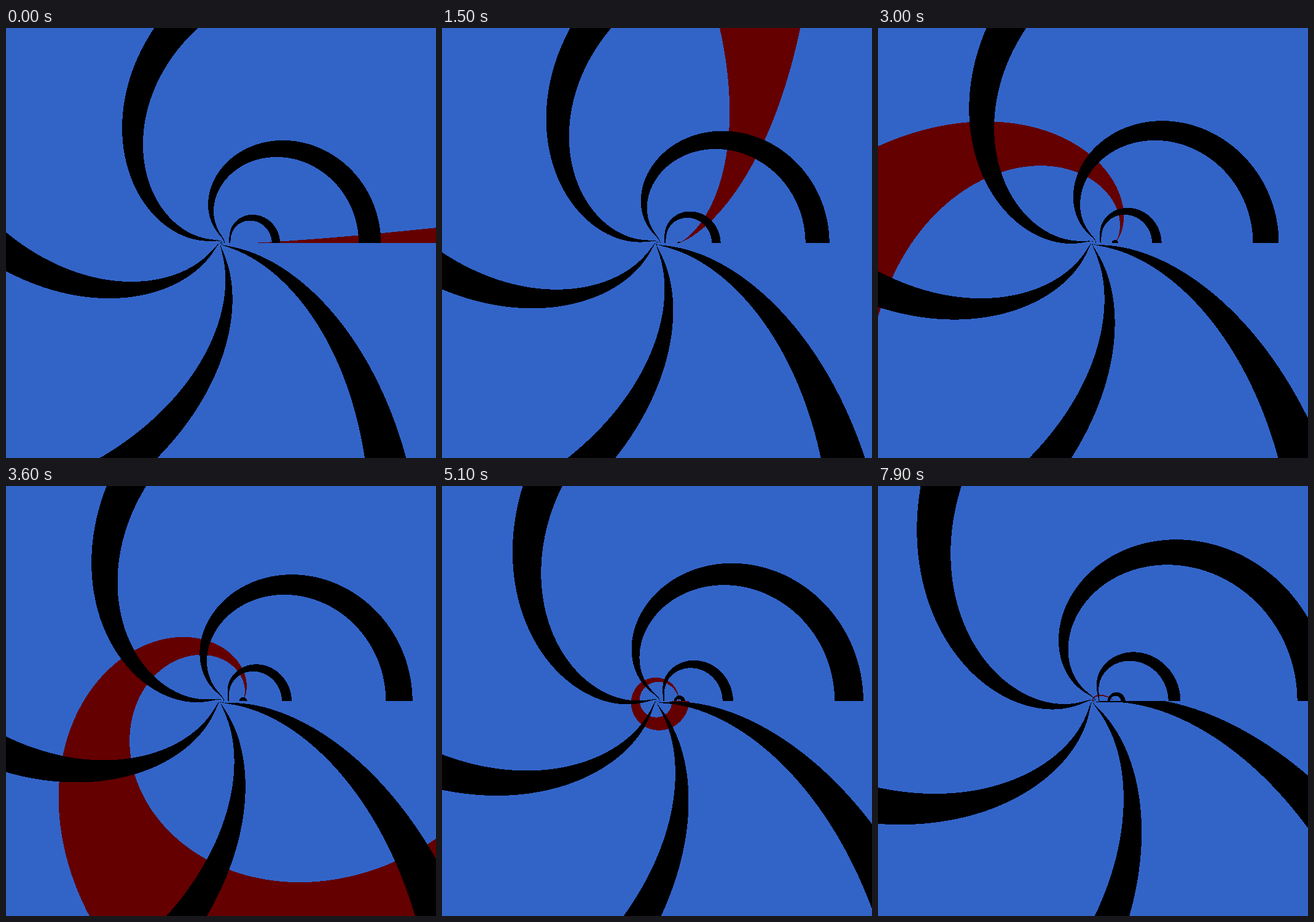
An HTML page with a canvas for the animation above (8 s loop, 700 by 700 pixels).

```html
<!DOCTYPE html>
<html lang="en">
<head>
<meta charset="utf-8">
<title>Complex logarithm</title>
<style>
  html, body { margin: 0; width: 100%; height: 100%; overflow: hidden; background: #3264c8; }
  canvas { display: block; width: 100vw; height: 100vh; image-rendering: pixelated; }
</style>
</head>
<body>
<canvas id="stage" width="700" height="700"></canvas>
<script>
const SIZE = 700, HALF = SIZE / 2, UNIT = 35, TAU = 2 * Math.PI;
const STEP_MS = 100, STEPS = 80, PHASE_STEP = 0.005;
const RING_WIDTH = 0.15, RAY_WIDTH = 0.02;

// 0xAABBGGRR
const BLUE = 0xffc86432, RED = 0xff000064, BLACK = 0xff000000;

const ctx = document.getElementById("stage").getContext("2d");
const image = ctx.createImageData(SIZE, SIZE);
const pixels = new Uint32Array(image.data.buffer);

// Modulus and argument (in turns) of w = log z, with the branch cut on the positive real axis.
const modulus = new Float64Array(SIZE * SIZE);
const turns = new Float64Array(SIZE * SIZE);
for (let row = 0, i = 0; row < SIZE; row++) {
  for (let col = 0; col < SIZE; col++, i++) {
    const x = (col - HALF) / UNIT, y = (HALF - row) / UNIT;
    let theta = Math.atan2(y, x);
    if (theta <= 0) theta += TAU;
    const logR = Math.log(Math.hypot(x, y));
    modulus[i] = Math.hypot(logR, theta);
    turns[i] = Math.atan2(theta, logR) / TAU;
  }
}

const fract = v => v - Math.floor(v);

function draw(step) {
  const phase = PHASE_STEP * (step + 1);
  for (let i = 0; i < pixels.length; i++) {
    pixels[i] = fract(modulus[i] - phase) >= 1 - RING_WIDTH ? BLACK
      : fract(turns[i] - phase) >= 1 - RAY_WIDTH ? RED
      : BLUE;
  }
  ctx.putImageData(image, 0, 0);
}

const start = performance.now();
let shown = -1;

function tick() {
  const elapsed = Math.max(0, performance.now() - start);
  const step = Math.floor(elapsed / STEP_MS) % STEPS;
  if (step !== shown) draw(shown = step);
  requestAnimationFrame(tick);
}
tick();
</script>
</body>
</html>
```
